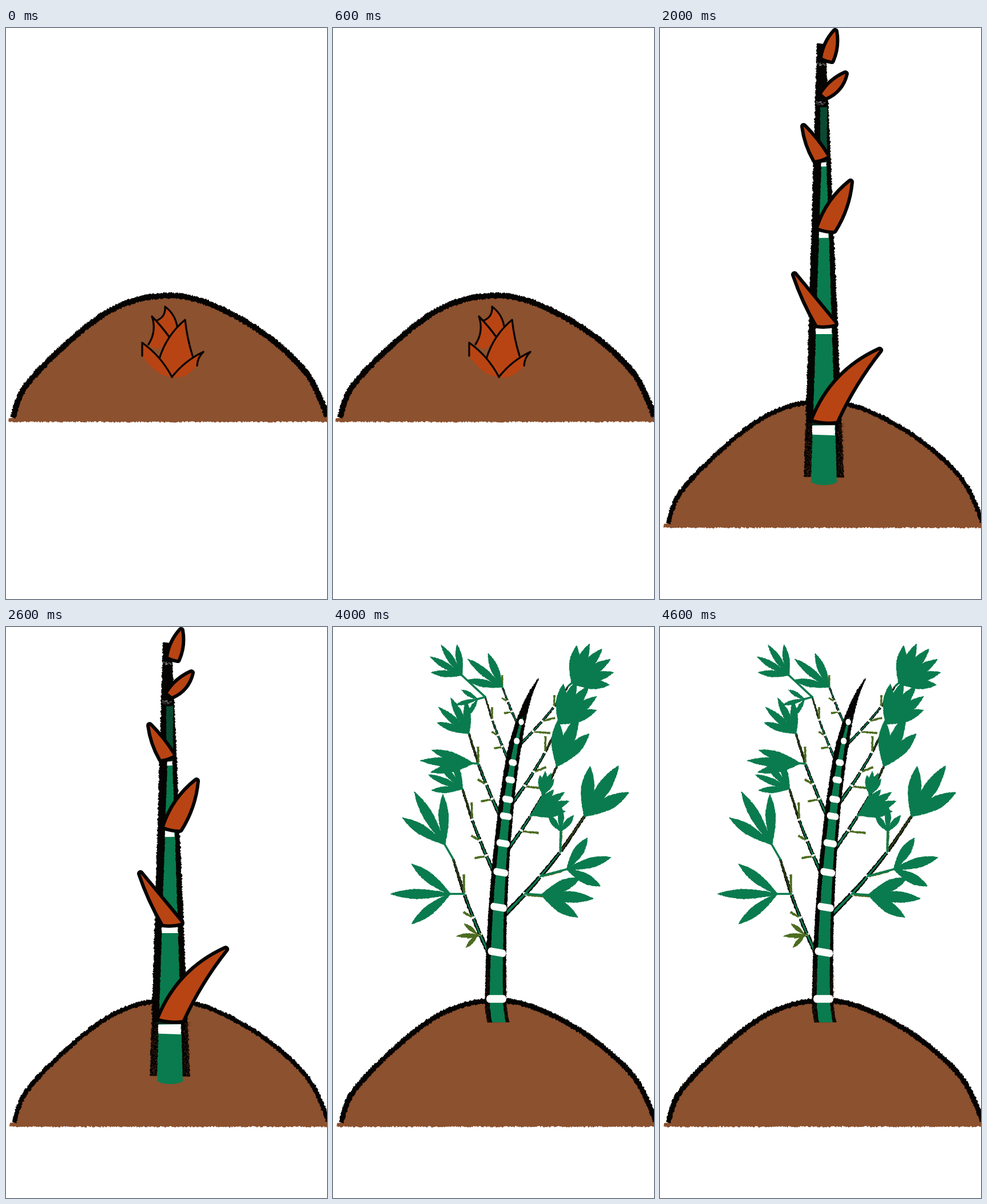
These frames come from a looping animation (561 px wide and 998 px high, 5000 ms). An HTML page with a canvas:

```html
<!DOCTYPE html>
<html lang="en">
<head>
<meta charset="utf-8">
<title>Growing bamboo</title>
<style>
html, body { margin: 0; width: 100%; height: 100%; overflow: hidden; background: #fff; }
canvas { display: block; width: 100vw; height: 100vh; }
</style>
</head>
<body>
<canvas id="stage" width="561" height="998"></canvas>
<script>
const ctx = document.getElementById('stage').getContext('2d');
const BLACK = '#050403', SOIL = '#8c512f', ORANGE = '#b94413';
const GREEN = '#0a7b4e', OLIVE = '#4c6c20', WHITE = '#fdfdfb';
const STEP = 1000;

let seed = 1;
function rand() {
  seed = (seed * 16807) % 2147483647;
  return seed / 2147483647;
}
const wobble = a => (rand() - 0.5) * 2 * a;

// Catmull-Rom curve sampled about every 1.5 px
function curve(p) {
  const out = [];
  for (let i = 0; i < p.length - 1; i++) {
    const a = p[Math.max(i - 1, 0)], b = p[i], c = p[i + 1], d = p[Math.min(i + 2, p.length - 1)];
    const n = Math.max(2, Math.ceil(Math.hypot(c[0] - b[0], c[1] - b[1]) / 1.5));
    for (let k = 0; k < n; k++) {
      const t = k / n;
      out.push([0, 1].map(j => 0.5 * (2 * b[j] + (c[j] - a[j]) * t +
        (2 * a[j] - 5 * b[j] + 4 * c[j] - d[j]) * t * t +
        (3 * b[j] - a[j] - 3 * c[j] + d[j]) * t * t * t)));
    }
  }
  out.push(p[p.length - 1]);
  return out;
}

function fillPoly(p, color, rough = 0) {
  ctx.beginPath();
  for (const [x, y] of p) ctx.lineTo(x + wobble(rough), y + wobble(rough));
  ctx.closePath();
  ctx.fillStyle = color;
  ctx.fill();
}

// Stroke with ragged edges and a width running from w0 to w1
function brush(p, color, w0, w1 = w0, rough = 0.4) {
  const c = curve(p), a = [], b = [];
  c.forEach(([x, y], i) => {
    const q = c[Math.max(i - 1, 0)], r = c[Math.min(i + 1, c.length - 1)];
    const len = Math.hypot(r[0] - q[0], r[1] - q[1]) || 1;
    const nx = (q[1] - r[1]) / len, ny = (r[0] - q[0]) / len;
    const w = (w0 + (w1 - w0) * i / (c.length - 1)) / 2;
    const u = w + wobble(rough), v = w + wobble(rough);
    a.push([x + nx * u, y + ny * u]);
    b.push([x - nx * v, y - ny * v]);
  });
  fillPoly(a.concat(b.reverse()), color);
}

function line(x0, y0, x1, y1, w, color) {
  ctx.beginPath();
  ctx.moveTo(x0, y0);
  ctx.lineTo(x1, y1);
  ctx.lineWidth = w;
  ctx.lineCap = 'round';
  ctx.strokeStyle = color;
  ctx.stroke();
}

// Upright band whose centre and width are functions of y
function column(y0, y1, mid, width, color, rough) {
  const a = [], b = [];
  for (let y = y0; y <= y1; y += 1.5) {
    a.push([mid(y) - width(y) / 2, y]);
    b.push([mid(y) + width(y) / 2, y]);
  }
  fillPoly(a.concat(b.reverse()), color, rough);
}

function grain(x, y0, y1, n) {
  ctx.fillStyle = 'rgba(110,58,32,.6)';
  for (let i = 0; i < n; i++) ctx.fillRect(x + wobble(6), y0 + rand() * (y1 - y0), 1.4, 1.4);
}

function mound(dx, dy, w) {
  const rim = curve([[12, 681], [35, 625], [110, 548], [185, 492.5], [260, 469],
    [340, 476.5], [440, 527], [525, 603], [566, 690]]);
  const base = [];
  for (let x = 566; x > 4; x -= 1.6) base.push([x, 688.5 + wobble(1.3)]);
  ctx.save();
  ctx.translate(dx, dy);
  fillPoly(rim.concat(base, [[4, 688], [5, 682]]), SOIL, 0.4);
  brush(rim.filter((p, i) => i % 4 === 0 && p[1] < 683), BLACK, w, w, 1.3);
  ctx.restore();
}

// Pointed scale: two bowed edges meet at the tip, the foot sags
function petal(l, tip, r, bowL, bowR, sag = 0.35) {
  const ctl = (a, b, bow) => [(a[0] + b[0]) / 2 + (b[1] - a[1]) * bow, (a[1] + b[1]) / 2 - (b[0] - a[0]) * bow];
  const sides = new Path2D();
  sides.moveTo(...l);
  sides.quadraticCurveTo(...ctl(l, tip, bowL), ...tip);
  sides.quadraticCurveTo(...ctl(tip, r, bowR), ...r);
  const body = new Path2D(sides);
  body.quadraticCurveTo((l[0] + r[0]) / 2, (l[1] + r[1]) / 2 + sag * Math.abs(r[0] - l[0]), ...l);
  body.closePath();
  return { sides, body };
}

function scale(...shape) {
  const { sides, body } = petal(...shape);
  ctx.lineCap = ctx.lineJoin = 'round';
  ctx.fillStyle = ORANGE;
  ctx.fill(body);
  ctx.lineWidth = 3.3;
  ctx.strokeStyle = '#0b0503';
  ctx.stroke(sides);
}

function sheath(...shape) {
  const { body } = petal(...shape, 0.1);
  ctx.lineJoin = 'round';
  ctx.lineWidth = 12;
  ctx.strokeStyle = BLACK;
  ctx.stroke(body);
  ctx.fillStyle = ORANGE;
  ctx.fill(body);
}

// Upper scales, shared by both early stages
function crown(dx, dy) {
  ctx.save();
  ctx.translate(dx, dy);
  scale([261, 512], [278, 487], [299, 521], -0.4, 0.2, 1);
  scale([249, 553], [255, 504], [286, 541], -0.24, 0.04, 0.7);
  scale([268, 578], [313, 510], [326, 573], 0.15, -0.05, 1);
  ctx.restore();
}

function bud() {
  mound(0, 0, 10);
  crown(0, 0);
  scale([238, 573], [238, 550], [290, 610], 0, 0.12);
  scale([290, 610], [345, 566], [334, 590], 0.12, -0.2);
}

function sprout() {
  mound(0, 0, 10);
  crown(-8, -95);
  scale([213, 543], [228, 452], [275, 515], 0.08, 0.12, 0.6);
  scale([250, 552], [328, 477], [322, 542], 0.17, -0.15);
}

function stalk() {
  const mid = y => 282 + y * 0.006;
  const outer = y => 14 + y * 0.071;
  const core = y => 10 + (y - 250) * 0.065;
  mound(2, 185, 8);
  column(27, 787, mid, outer, BLACK, 1.4);
  grain(259, 690, 786, 150);
  grain(316, 690, 786, 150);
  column(138, 230, () => 286, () => 12, '#0a4a32', 0.8);
  column(242, 794, () => 286.5, core, GREEN, 0.7);
  ctx.beginPath();
  ctx.ellipse(287, 792, 22, 7, 0, 0, 7);
  ctx.fill();
  for (const y of [703, 529, 362, 239]) {
    const h = 2 + y * 0.009, w = Math.max(6, core(y));
    column(y - h - 9, y - h, () => 286, () => w + 2, '#052519', 0.6);
    column(y - h, y + h, () => 286, () => w, WHITE, 0.8);
  }
  ctx.fillStyle = 'rgba(190,190,190,.5)';
  for (const y of [131, 63])
    for (let i = 0; i < 26; i++) ctx.fillRect(280 + wobble(9), y + wobble(3), 1.8, 1.2);
  sheath([268, 684], [384, 563], [308, 687], 0.2, -0.06);
  sheath([275, 519], [235, 431], [306, 517], 0.05, 0);
  sheath([277, 349], [333, 269], [304, 354], 0.15, 0.12);
  sheath([271, 231], [251, 172], [292, 224], 0.1, 0.06);
  sheath([283, 115], [324, 80], [290, 121], 0.15, 0.25);
  sheath([284, 52], [306, 6], [300, 57], 0.15, 0.15);
}

// Leaning trunk of the two late stages
function trunkX(y) {
  const u = Math.max(0, (730 - y) / 740), foot = Math.max(0, (y - 730) / 58);
  return 273 + 130 * (0.68 * u ** 2 + 0.32 * u ** 10) + 8 * foot ** 2;
}
const trunkW = y => (33 + 0.0425 * (y + 10)) * Math.min(1, ((y + 10) / 150) ** 0.6);
const coreW = y => 40 * Math.sqrt(Math.max(0, y - 80) / 650);

function trunk() {
  column(-10, 787, trunkX, trunkW, BLACK, 1.3);
  grain(249, 665, 785, 150);
  grain(302, 665, 785, 150);
  column(80, 789, y => trunkX(y) + 2, coreW, GREEN, 0.9);
  for (const y of [733, 625, 521, 440, 373, 310, 271, 226, 186, 136, 92]) {
    const r = 6.8 + y * 0.0028, half = Math.max(1, coreW(y) * 0.75 - r), tilt = y > 700 ? 0 : half * 0.13;
    const x = trunkX(y) + 2;
    line(x - half, y - tilt, x + half, y + tilt, r * 2, WHITE);
  }
}

// side, foot height, reach to the tip
const BRANCHES = {
  a: [-1, 625, -104, -213], b: [-1, 437, -92, -188], c: [-1, 305, -90, -184],
  d: [-1, 175, -66, -139], e: [-1, 92, -62, -128],
  p: [1, 532, 172, -220], q: [1, 378, 103, -182], r: [1, 273, 99, -175], s: [1, 138, 102, -128]
};
const NODES = [[0.23, 0.19], [0.43, 0.372], [0.685, 0.625], [1, 1]];
const shrink = ([x, y]) => [286 + (x - 276) * 0.58, 650 + (y - 733) * 0.755];

function limb(key, grown) {
  const [side, y, dx, dy] = BRANCHES[key];
  const foot = [trunkX(y) + trunkW(y) * (side < 0 ? -0.4 : 0.5), y];
  const [fx, fy] = grown ? shrink(foot) : foot;
  const kx = !grown ? 1 : side < 0 ? 0.59 : 0.79, ky = grown ? 0.765 : 1;
  return {
    side, w: Math.hypot(dx, dy) * 0.047 * (grown ? 0.65 : 1),
    at: (u, v) => [fx + dx * kx * u, fy + dy * ky * v]
  };
}

// Every branch is one pattern, stretched between its foot and its tip
function branch(key, grown) {
  const { at, w } = limb(key, grown);
  const nodes = NODES.map(n => at(...n)), spine = [at(-0.06, -0.05), ...nodes];
  const tw = 2 + w * 0.33;
  const twig = (a, b, c, d) => brush([at(a, b), at(c, d)], OLIVE, tw * 0.8, tw, 0.6);
  brush(spine, BLACK, w * 1.1, w * 0.6, 0.6);
  brush(spine.slice(0, 4), GREEN, w * 0.55, w * 0.25, 0.3);
  brush(spine.slice(3), '#2b3c12', w * 0.35, w * 0.4, 0.3);
  twig(0.24, 0.18, 0.605, 0.157);
  twig(0.44, 0.37, 0.71, 0.43);
  twig(0.685, 0.63, 0.695, 0.835);
  if (!grown) {
    twig(0.97, 0.95, 1.2, 1.035);
    twig(0.98, 0.94, 1.02, 1.03);
  }
  const [x0, y0] = at(0, 0), [x1, y1] = at(1, 1);
  const h = w * 0.26 / Math.hypot(x1 - x0, y1 - y0);
  const nx = (y0 - y1) * h, ny = (x1 - x0) * h;
  for (const [x, y] of nodes.slice(0, 3)) line(x - nx, y - ny, x + nx, y + ny, w * 0.2 + 2.2, WHITE);
  if (!grown) line(x0 - 3, y0 - 50, x0 - 2, y0 - 27, key < 'f' ? 1.2 : 0.01, BLACK);
}

function branches() {
  mound(2, 185, 9);
  for (const key in BRANCHES) branch(key, false);
  trunk();
}

function leaf(x, y, angle, len, w, color) {
  const c = Math.cos(angle), s = Math.sin(angle);
  const edge = k => [[0, 0.08], [0.25, 0.34], [0.55, 0.5], [0.8, 0.34], [1, 0.03]].map(([t, o]) =>
    [x + c * len * t - s * o * w * k, y + s * len * t + c * o * w * k]);
  fillPoly(curve(edge(1)).concat(curve(edge(-1)).reverse()), color, 0.5);
}

// A stalk from a branch node, then a fan of leaves, longest in the middle
function sprig(key, node, deg, stalk, len, n = 3, spread = 56, color = GREEN) {
  const { at, side } = limb(key, true), rad = Math.PI / 180;
  const [x0, y0] = at(...NODES[node]);
  const x = x0 + Math.cos(deg * rad) * stalk, y = y0 + Math.sin(deg * rad) * stalk;
  line(x0, y0, x, y, 3.5, color);
  for (let i = 0; i < n; i++) {
    const k = i / (n - 1) * 2 - 1;
    leaf(x, y, (deg + k * spread / 2) * rad, len * (1 - 0.18 * k * k), 2 + len * (side < 0 ? 0.15 : 0.2), color);
  }
}

function bamboo() {
  mound(2, 185, 9);
  for (const key in BRANCHES) branch(key, true);
  ctx.save();
  ctx.translate(286, 650);
  ctx.scale(0.58, 0.755);
  ctx.translate(-276, -733);
  trunk();
  ctx.restore();

  // Tips
  sprig('a', 3, -120, 30, 106);
  sprig('b', 3, -145, 0, 66, 4, 76);
  sprig('c', 3, -128, 0, 72, 4, 66);
  sprig('d', 3, -137, 56, 66, 4, 76);
  sprig('e', 2, -141, 0, 78);
  sprig('p', 3, -56, 0, 106);
  sprig('q', 3, -67, 0, 97, 3, 44);
  sprig('r', 3, -52, 0, 85, 5, 64);
  sprig('s', 3, -40, 8, 80, 6, 86);
  // Sides
  sprig('a', 2, 180, 25, 104, 3, 76);
  sprig('a', 0, 176, 4, 38, 3, 86, OLIVE);
  sprig('c', 2, 183, 10, 92, 3, 30);
  sprig('d', 3, 165, 14, 40, 3, 90);
  sprig('p', 0, 4, 30, 90);
  sprig('p', 1, -15, 48, 80, 3, 84);
  sprig('p', 2, -89, 36, 44, 3, 76);
  sprig('q', 1, -28, 4, 70, 4, 44);
  sprig('q', 2, -76, 2, 42, 4, 44);
}

const scenes = [bud, sprout, stalk, branches, bamboo];
let shown = -1;

function draw(i) {
  seed = 97 + i * 31;
  ctx.fillStyle = '#fff';
  ctx.fillRect(0, 0, 561, 998);
  scenes[i]();
}

const start = performance.now();
function tick() {
  const i = Math.floor((performance.now() - start) / STEP) % scenes.length;
  if (i !== shown) draw(shown = i);
  requestAnimationFrame(tick);
}
tick();
</script>
</body>
</html>
```
